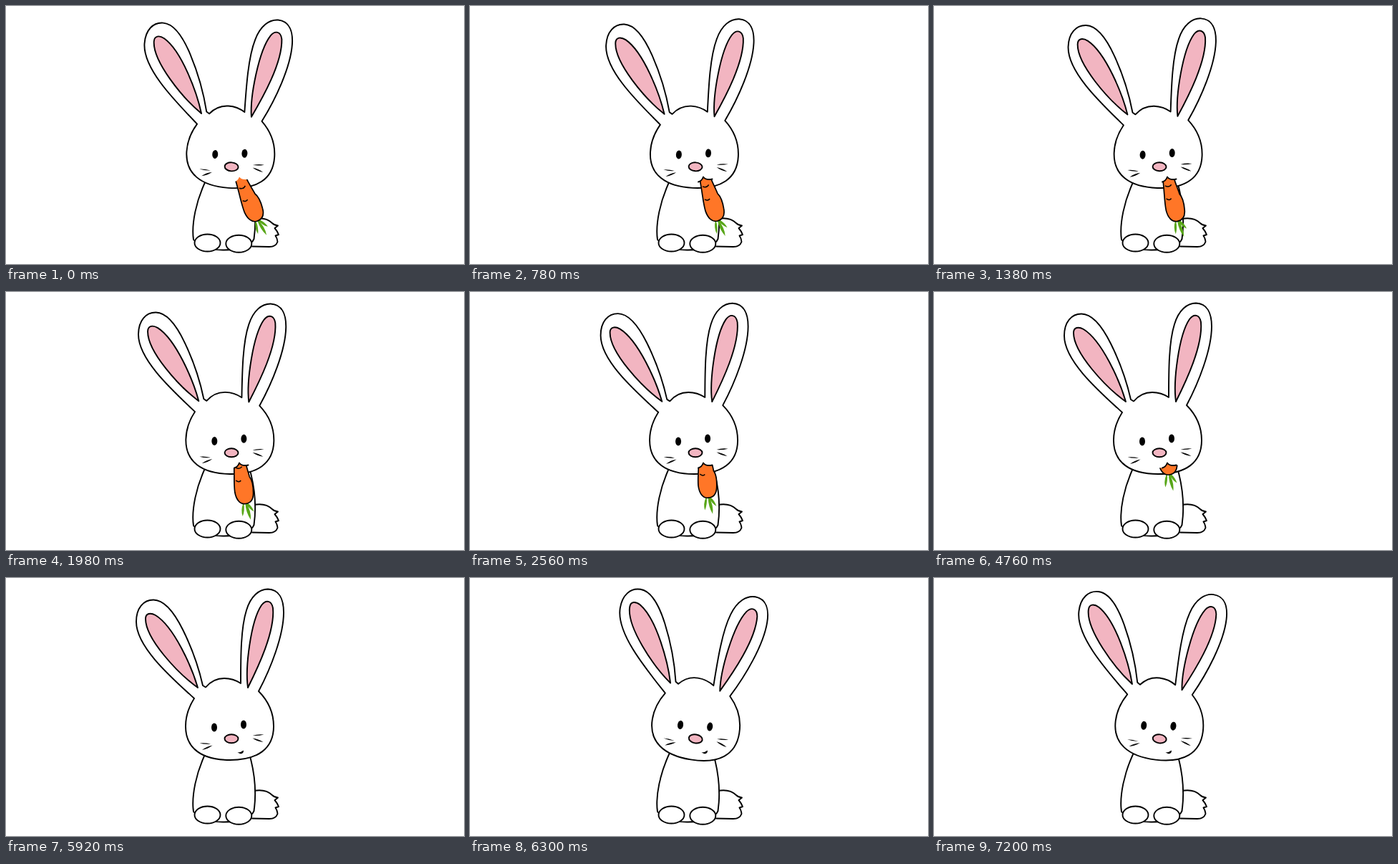
These frames come from a looping animation (640 by 360 pixels, 7.5 s). An HTML page:

```html
<!DOCTYPE html>
<html lang="en">
<head>
<meta charset="utf-8">
<title>Rabbit eating a carrot</title>
<style>
  html, body { margin: 0; width: 100%; height: 100%; overflow: hidden; background: #fff; }
  svg { display: block; width: 100vw; height: 100vh; }
  .line { fill: #fff; stroke: #000; stroke-width: 1.9; stroke-linejoin: round; stroke-linecap: round; }
  .pink { fill: #f2b5c1; }
</style>
</head>
<body>
<svg viewBox="0 0 640 360">
  <defs>
    <clipPath id="below">
      <path d="M300 245 L319 245.500 Q324 244 326 238.500 Q330 243.500 338.500 241.500 L390 242 V350 H300 Z"/>
    </clipPath>
  </defs>

  <g class="line">
    <path d="M346 297 C357 295 366 297 372 303 Q375 306 380 306.500 L375.500 310 Q379 314 381 319 L376.500 320.500 Q379 324 379.500 329 Q377 336 368 336 L344 335.500"/>
    <path d="M281 240 C265 272 259 305 262 326 Q275 341 305 340.500 Q340 340 346.500 325 C350 300 349 275 339 242 Z"/>
    <ellipse cx="281.500" cy="330.500" rx="18" ry="12"/>
    <ellipse cx="325.300" cy="331.800" rx="18" ry="12"/>
  </g>

  <g id="head">
    <path class="line" d="M263 168 C230 138 182 96 182 61 C182 42 192 30.500 206 30.500
      C222 30.500 236 50 247 72 C262 102 270 128 275 150 L279 152.500
      C287 143 297 140 305 140 C314 140 322 143 328 147
      C328 110 328 70 336 45 C342 25 354 15.500 366 15.500 C382 16 388 30 388 48
      C388 80 370 126 353 158 C366 171 374 188 374 207
      C374 238 352 254 313 254 C274 254 251 238 251 207 C251 192 256 179 263 168 Z"/>
    <path class="line pink" d="M268 153 C240 133 195 85 195 57 C195 49 202 48 209 52 C235 68 260 125 268 153 Z"/>
    <path class="line pink" d="M338 153 C334 125 342 60 357 38 C363 30 371 31 373 42 C376 75 352 125 338 153 Z"/>
    <ellipse id="eyeL" rx="4" ry="6"/>
    <ellipse id="eyeR" rx="4" ry="6"/>
    <path d="M270.500 230.500 Q278 229.500 286 231.500 Q278 232.500 270.500 230.500 Z
      M274 240 Q280 235 288.500 233.500 Q282 238.500 274 240 Z
      M344.500 220 Q352 217.500 360.500 218.500 Q353 220.500 344.500 220 Z
      M344.500 223.500 Q353 224.500 359.500 229 Q351 228 344.500 223.500 Z"/>
    <ellipse class="line pink" cx="315" cy="224.300" rx="9.500" ry="6"/>
  </g>
  <path id="mouth" d="M323.500 243.500 Q328 243.500 332 240.500 Q332 245.500 327.500 245.300 Z"/>

  <g id="food">
    <g clip-path="url(#below)">
      <g id="carrot">
        <path fill="#58a618" d="M1 -1 Q7 11 4.500 23 Q-1 12 0 -1 Z
          M-2 -1 Q-2 10 -6 17 Q-8 8 -3 -1 Z M3 -1 Q9 5 10.500 12.500 Q4 8 1.500 0 Z"/>
        <path d="M0 0 C-8 0 -12 -8 -12.500 -18 C-12.500 -32 -9 -46 -7.500 -68 L7 -68
          C7 -54 10 -44 10.500 -37 C13.500 -32 14 -22 13 -14 C12 -4 7 0 0 0 Z"
          fill="#ff7627" stroke="#000" stroke-width="1.700"/>
        <path d="M-9 -34 Q-5 -30 -2 -33 M-7 -52 Q-2 -48 2 -52" fill="none" stroke="#000" stroke-width="1.500"/>
      </g>
    </g>
    <path id="bite" class="line" style="fill:none" d="M319 245.500 Q324 244 326 238.500 Q330 243.500 338.500 241.500"/>
  </g>
</svg>
<script>
const LOOP = 7500;
const EATEN = 5920;
const get = id => document.getElementById(id);
const clamp = x => Math.max(0, Math.min(1, x));
const mix = (a, b, k) => a + (b - a) * k;
const span = (t, from, to) => clamp((t - from) / (to - from));
const smooth = k => k * k * (3 - 2 * k);

// time, x, y of the leafy end of the carrot
const carrotPath = [
  [0, 351.5, 300], [780, 346, 300], [1460, 339.5, 300.5], [1980, 334.5, 295.5],
  [3380, 330.5, 275.5], [4760, 328, 255], [EATEN, 326, 239]
];

function along(path, t) {
  const i = Math.max(1, path.findIndex(p => p[0] > t));
  const [a, b] = [path[i - 1], path[i]];
  const k = span(t, a[0], b[0]);
  return [mix(a[1], b[1], k), mix(a[2], b[2], k)];
}

function headAngle(t) {
  if (t < 5960) return 3.9 * (1 - span(t, 0, 2700));
  const swing = 9.1 * smooth(span(t, 5960, 6300));
  return swing - 2.3 * smooth(span(t, 6300, 6450));
}

function show(el, on) {
  el.setAttribute("visibility", on ? "inherit" : "hidden");
}

function draw(t) {
  get("head").setAttribute("transform", `rotate(${headAngle(t)} 314.5 226)`);

  const lid = t >= 7120 && t < 7200 ? 0.1 : 1;
  get("eyeL").setAttribute("transform", `translate(291 208.5) scale(1 ${lid})`);
  get("eyeR").setAttribute("transform", `translate(332 204.5) scale(1 ${lid})`);

  const eating = t < EATEN;
  show(get("food"), eating);
  show(get("mouth"), !eating);
  if (!eating) return;
  const [x, y] = along(carrotPath, t);
  const tilt = mix(21.5, 4.5, span(t, 0, 2400));
  get("carrot").setAttribute("transform", `translate(${x} ${y}) rotate(${-tilt})`);
  show(get("bite"), t >= 400);
}

const start = performance.now();
function tick() {
  draw((performance.now() - start) % LOOP);
  requestAnimationFrame(tick);
}
tick();
</script>
</body>
</html>
```
